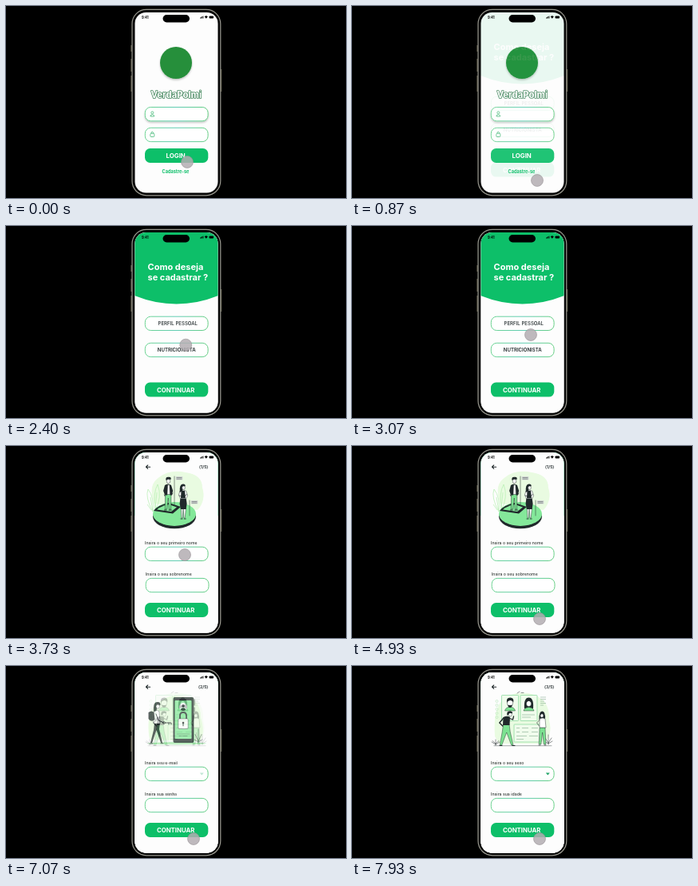
These frames come from a looping animation (426 by 240 pixels, 8000 ms). An HTML page:

```html
<!DOCTYPE html>
<html lang="pt">
<head>
<meta charset="utf-8">
<title>Protótipo de cadastro</title>
<style>
  html, body { margin: 0; width: 100%; height: 100%; overflow: hidden; background: #000; }
  svg { display: block; width: 100%; height: 100%; }
  text { font-family: Inter, "Open Sans", sans-serif; }
  .label { font-size: 5.2px; font-weight: 500; fill: #343b37; }
  .action { font-size: 7.8px; font-weight: 700; fill: #fff; text-anchor: middle; }
  .dark { fill: #20292b; }
  .ink { stroke: #20292b; fill: none; stroke-linecap: round; stroke-linejoin: round; }
  .mint { fill: #84e89a; }
  .pale { fill: #e9fbe1; }
  .sprig { fill: none; stroke: #b5efb0; stroke-width: .7; }
  .skin { fill: #fff; stroke: #20292b; stroke-width: .45; }
  .cloth { fill: #7ce291; stroke: #20292b; stroke-width: .45; }
</style>
</head>
<body>
<svg viewBox="0 0 426 240">
  <defs>
    <linearGradient id="edge">
      <stop stop-color="#6bd391"/><stop offset=".5" stop-color="#62cdb5"/><stop offset="1" stop-color="#65ce83"/>
    </linearGradient>
    <clipPath id="glass"><rect x="161.5" y="8" width="104" height="225.5" rx="14"/></clipPath>
    <filter id="soft" x="-20%" y="-40%" width="140%" height="200%">
      <feDropShadow dx="0" dy="1.5" stdDeviation="1" flood-opacity=".25"/>
    </filter>
  </defs>
  <g fill="#5b5747">
    <rect x="156.3" y="49" width="1.5" height="8"/>
    <rect x="156.3" y="66" width="1.5" height="16"/>
    <rect x="156.3" y="87" width="1.5" height="20"/>
    <rect x="268.8" y="79" width="1.5" height="28"/>
  </g>
  <rect x="158" y="4.3" width="110.8" height="232.5" rx="18" fill="#050505" stroke="#99988f" stroke-width="1.2"/>
  <g clip-path="url(#glass)">
    <g id="screens"></g>
    <text x="170" y="15.7" font-size="4.2" font-weight="700">9:41</text>
    <path d="M243 15.5v-1h.8v1zm1.2 0v-1.7h.8v1.7zm1.2 0v-2.4h.8v2.4zm1.2 0v-3h.8v3zM248.8 13.3q2-2 4 0l-2 2.4z"/>
    <rect x="254.6" y="12.5" width="5.4" height="3" rx=".8"/>
    <rect x="196.5" y="11" width="33.5" height="9.5" rx="4.75"/>
  </g>
  <circle id="pointer" r="7.5" fill="#b3adb1" fill-opacity=".85" stroke="#989296" stroke-width=".6"/>
</svg>
<script>
const GREEN = '#0dbf69';

const text = (x, y, value, attrs = 'class="label"') => `<text x="${x}" y="${y}" ${attrs}>${value}</text>`;
const box = (x, y, w, h, rx, attrs) => `<rect x="${x}" y="${y}" width="${w}" height="${h}" rx="${rx}" ${attrs}/>`;
const path = (d, style) => `<path d="${d}" class="${style}"/>`;
const ink = (d, width = .6) => `<path d="${d}" class="ink" stroke-width="${width}"/>`;
const circle = (x, y, r, attrs) => `<circle cx="${x}" cy="${y}" r="${r}" ${attrs}/>`;
const ellipse = (x, y, rx, ry, attrs) => `<ellipse cx="${x}" cy="${y}" rx="${rx}" ry="${ry}" ${attrs}/>`;
const field = (y, extra = '', x = 174.3) => box(x, y, 78.8, 17.3, 7, `fill="#fff" stroke="url(#edge)" ${extra}`);
const button = (y, label) =>
  box(174, y, 79.3, 18, 6.5, `fill="${GREEN}"`) + text(212.7, y + 11.9, label, 'class="action"');
const leaves = (x, y, h) =>
  ink(`M${x} ${y}v${-h}M${x} ${y - 2}l-4 ${-h * .5}M${x} ${y - 2}l4 ${-h * .5}M${x} ${y - 1}l-5 -3M${x} ${y - 1}l5 -3`, .5);
const face = (x, y, r) => ellipse(x, y, r * .85, r, 'class="skin"');

const login =
  circle(213, 71, 20, 'fill="#278f3b" filter="url(#soft)"') +
  text(213.3, 115, 'VerdaPolmi', `font-size="11.4" font-weight="700" text-anchor="middle" fill="#fff"
    stroke="#40845a" stroke-width="1.5" stroke-linejoin="round" paint-order="stroke"`) +
  field(126.5, 'filter="url(#soft)"') + field(152.3) +
  `<g fill="none" stroke="#45b978" stroke-width=".8">
    ${circle(183.3, 133.4, 1.5, '')}${path('M181 138v-1.2q2.3-2.5 4.6 0v1.2z', '')}
    ${box(180.8, 159.3, 5, 4.2, 1, '')}${path('M182 159v-1q1.3-1.7 2.6 0v1', '')}</g>` +
  button(178, 'LOGIN') +
  text(212.5, 209, 'Cadastre-se', `font-size="5.6" font-weight="700" text-anchor="middle" fill="${GREEN}"`);

const heading = 'font-size="11" font-weight="700" fill="#fff"';
const choice =
  `<path d="M161 8H266V87Q213.5 108 161 87Z" fill="${GREEN}"/>` +
  text(177.5, 54.7, 'Como deseja', heading) + text(177.5, 68, 'se cadastrar ?', heading) +
  field(113.2) + text(215.3, 124, 'PERFIL PESSOAL', 'font-size="6.1" font-weight="500" text-anchor="middle" class="dark"') +
  field(146.3) + text(213.7, 157, 'NUTRICIONISTA', 'font-size="6.1" font-weight="600" text-anchor="middle" class="dark"') +
  button(195.6, 'CONTINUAR');

const form = (step, art, first, second, { indent = 0, extra = '' } = {}) =>
  art + ink('M180.6 26.2h-5M177.7 24l-2.3 2.2 2.3 2.2', 1.1) +
  text(253.3, 28, `(${step}/5)`, 'font-size="5.2" font-weight="600" text-anchor="end" class="dark"') +
  text(174, 123, first) + field(126.2) +
  text(174 + indent, 162, second) + field(165.4, '', 174.3 + indent) + extra + button(196, 'CONTINUAR');

const flag = (x, y, h) =>
  ink(`M${x} ${y}v${h}`, .5) + box(x + 1.8, y, 8.5, 4.6, .4, 'fill="#d3d8d5"') +
  ink(`M${x + 3} ${y + 1.5}h6m-6 1.7h6`, .4);

const platform =
  path('M186 72Q177 48 192 39Q205 29 225 33Q246 36 246 52Q251 68 240 80Z', 'pale') +
  path('M184 82Q174 64 178 54Q186 64 184 82ZM187 80Q184 58 190 48Q196 64 187 80M184 82l-3-18m6 14l2-20m-7 22l-5-7', 'sprig') +
  ellipse(211, 88.3, 27, 15, 'class="dark"') + ellipse(211, 85, 27, 15, 'class="mint"') +
  path('M185 81Q190 74 204 71L219 76 209 84.5Z', 'dark') + path('M189 79.5Q193 75.5 204 73L214 76.5 207 82Z', 'mint') +
  flag(211, 38, 35) + flag(230, 68, 19) +
  // standing pair
  path('M199.5 60h7.5l-.4 19h-2.2l-1.1-14-1.7 14h-2.3z', 'cloth') +
  path('M199 49q4-3 8 0l2.2 7-1.5 5.5h-2.4l-.5-12h-2l-.7 12h-3l-2-5.5z', 'dark') +
  path('M202.7 48.5h2.2l.5 12h-3.4z', 'skin') + ink('M198.4 61l.6 1.5M207.8 61l1-2', .8) +
  face(203.5, 44, 2.7) + path('M200.5 43q-1-4.5 3-4.2 4-.6 3 3.2l-3.6-.4z', 'dark') +
  ink('M198.5 80h2.5m3.2 0h3', 1.2) +
  path('M219.3 77l.7 13h1.2l.8-13 1 13h1.2l1.3-13z', 'skin') +
  path('M218.4 65h7.2l1 7-1 7h-6.8l-1.2-7z', 'dark') +
  path('M218 56q4-2 7.5 0l2 6-2 4h-7l-2-5z', 'skin') + path('M219.5 56h4.5l1 9.5h-6z', 'dark') +
  path('M217.8 58q-1-11 4.2-10.6 3 .2 2.7 3-2-.2-3 .5l-.5 5z', 'dark') + face(222.5, 52.2, 2.2) +
  ink('M217 62l5.5 1.6 4-3', .7) + ink('M219 91h2m2.2 0h2', .9);

const lockedPhone =
  path('M180 92Q174 58 190 48Q197 38 213 37Q244 37 244 64Q250 84 243 94Z', 'pale') +
  ellipse(214, 96.8, 37, 1.6, 'fill="#a9eab0"') + leaves(241, 96, 17) +
  box(209.5, 39, 25.8, 57, 2, 'class="dark"') + box(211.5, 43, 21, 48, 1, 'class="mint"') +
  ink('M236 42v7m0 3v5', .8) + `<path d="M218 41h7" stroke="#aaa" stroke-width=".6"/>` +
  circle(222, 51.3, 5, 'fill="#fff"') + circle(222, 49.8, 1.8, 'class="dark"') + path('M218.5 54.5q3.5-4.5 7 0-3.5 3-7 0z', 'dark') +
  ink('M218 67v-5q0-4 4-4t4 4v5', 1.8) + box(215.8, 66, 12.4, 12.5, 1.2, 'fill="#fff" stroke="#20292b" stroke-width=".5"') +
  circle(222, 71, 1.3, 'class="dark"') + ink('M222 71v3.8', 1) + ink('M214 85h16m-13 2.5h10', .4) +
  // walking figure with a key
  path('M186 71h7l-1 8 4 17h-2l-5.5-16-5.5 16h-2l4-16z', 'dark') +
  path('M186 56q4-2 6 1l1 15h-8l-2-9z', 'skin') +
  path('M178.5 58q4-3 7 0l1 9q-5 4-8-1z', 'dark') +
  path('M185 57q-1-13 5-12 4 0 3.4 4-4 0-5 7z', 'dark') + face(190.2, 50.6, 2.6) +
  path('M187 49q1-4.4 4-3.4 2.4.6 1.6 2.6-3-.8-5.6.8z', 'dark') + ink('M188 60l3 8 6 2.6M181 97h3m10-.3h3', .9) +
  ink('M197 71h10v2m-3-2v2', 1) + circle(198, 71, 1.5, 'class="ink" stroke-width=".7"');

const card = (x, y, w, h) => box(x, y, w, h, .7, 'fill="#f0fcec" stroke="#84d79a" stroke-width=".7"');
const profiles =
  path('M179 88Q177 60 185 47Q197 31 221 34Q249 40 247 68Q252 86 240 97H184Z', 'pale') +
  [0, 1, 2, 3, 4].map(i => circle(181.5, 44 + i * 5, 1.5, 'fill="none" stroke="#a9e0ac" stroke-width=".5"')).join('') +
  card(187.5, 36.5, 21, 32) + card(211, 36.5, 21, 32) + card(203, 73, 34, 22) +
  `<path d="M236 39h7m-7 2.5h7m-7 2.5h5m-5 2.5h7m-7 2.5h4M206 77.5h4m3 0h8m4 0h8m-27 5h4m3 0h8m4 0h8m-27 5h13m3 0h11m-27 4h9M213 61h16m-16 3h11"
    fill="none" stroke="#6f9b7c" stroke-width=".5"/>` +
  ink('M207 34l3-2m2 1.5h3', .5) +
  path('M191.5 56q1-4.5 6.5-5 5.5.5 6.5 5z', 'cloth') + face(198, 46, 4.2) +
  path('M194 46q-1-6.5 4.3-6.4 5 0 3.9 6-1.2-3-4.2-2.6t-4 3zM195 48.4q3 1.4 6 0-.8 3.6-3 3.6t-3-3.6z', 'dark') +
  path('M216 53q-1-13.5 5.5-13.5T227 53z', 'dark') +
  path('M215 56q1-4 6.5-4.4 5.5.4 6.5 4.4z', 'cloth') + face(221.5, 47, 3.6) +
  path('M218 46q0-4 3.5-4t3.5 4q-2-2.2-3.5-2.4-1.5.2-3.5 2.4z', 'dark') +
  leaves(180, 99, 7) + leaves(246, 98, 12) +
  // figures beside the board
  path('M189.5 73h7.5l1.2 9 3.8 17h-2.3l-6-16-6 16h-2.4l3-17z', 'cloth') +
  path('M189.5 64q5-2.5 8.5 0l-.5 10h-8.5z', 'dark') + ink('M189.8 65l-5 6 4 4', 1.4) + ink('M197.5 65.5l4 1.5 1-4', 1.3) +
  path('M194.5 62q-1.4-5.6 3.5-5.4 3 0 3 2.6l-3 .6z', 'dark') + face(198.3, 60.6, 2.4) +
  path('M195.3 60q0-3.4 3.2-3.4 2.6.2 2.5 2.2l-3.4.2z', 'dark') + ink('M185 99.5h3m13 0h3', 1) +
  path('M234.5 67q-.6-10 3.8-10.4 4.3.4 3.7 10.4z', 'dark') +
  path('M235 77h7l1 21h-2.6l-1.8-15-1.8 15h-2.6z', 'cloth') +
  path('M235 66q4-2 7 0l1 11h-8z', 'skin') + face(237.9, 62, 2.3) +
  path('M235.6 61q.3-3.6 2.7-3.6t2.5 3.6q-2-2-5.2 0z', 'dark') +
  ink('M235.5 67l-4 4 3 4M234 99h2m5 0h2', .6) + ink('M178 99.7h72', .4);

const screens = [
  { at: -1000, body: login },
  { at: 850, body: choice },
  { at: 3250, body: form(1, platform, 'Insira o seu primeiro nome', 'Insira o seu sobrenome', { indent: .9 }) },
  { at: 5450, body: form(2, lockedPhone, 'Insira seu e-mail', 'Insira sua senha') },
  { at: 7000, body: form(3, profiles, 'Insira o seu sexo', 'Insira sua idade',
      { extra: '<path d="M242.8 133.5h5l-2.5 3z" fill="#23a66a"/>' }) },
];
const layer = document.getElementById('screens');
layer.innerHTML = screens.map(s => `<g>${box(161, 8, 105, 226, 0, 'fill="#fdfdfd"')}${s.body}</g>`).join('');

// Pointer moves: start, end, from, to
const moves = [
  [0, 450, [227, 195], [232, 218]],
  [1800, 2600, [232, 218], [224, 136]],
  [3900, 4700, [224, 136], [235, 216]],
];
const LOOP = 8000, FADE = 250;
const clamp = v => Math.max(0, Math.min(1, v));
const ease = v => v * v * (3 - 2 * v);
const pointer = document.getElementById('pointer');

function draw() {
  const t = performance.now() % LOOP;
  screens.forEach((s, i) => layer.children[i].setAttribute('opacity', clamp((t - s.at) / FADE)));
  const [start, end, from, to] = moves.filter(m => t >= m[0]).pop();
  const k = ease(clamp((t - start) / (end - start)));
  const [x, y] = from.map((v, i) => v + (to[i] - v) * k);
  pointer.setAttribute('cx', x);
  pointer.setAttribute('cy', y);
  requestAnimationFrame(draw);
}
draw();
</script>
</body>
</html>
```
